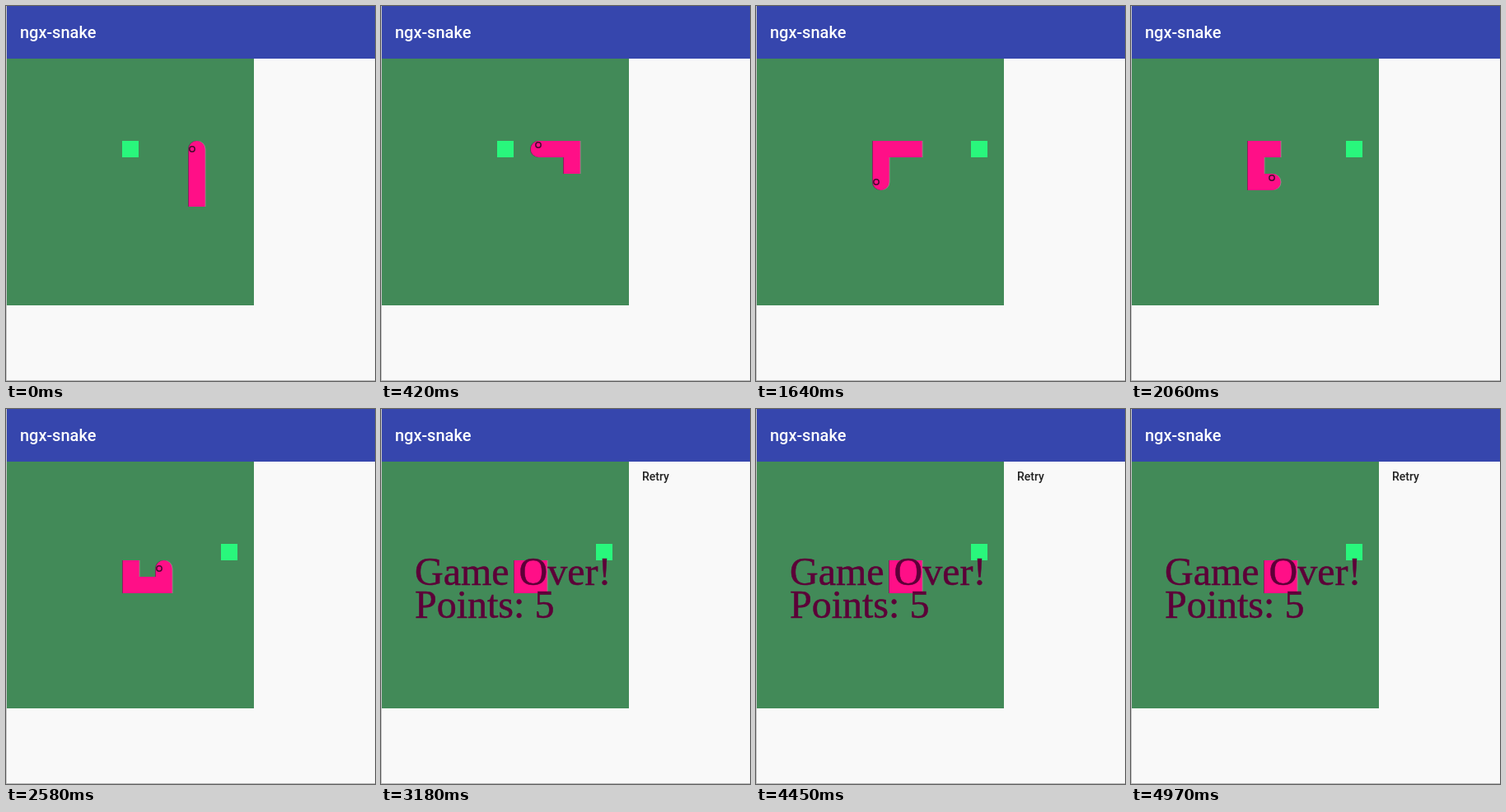
These frames come from a looping animation (448x456 px, 5 s). An HTML page:

```html
<!DOCTYPE html>
<html lang="en">
<head>
<meta charset="utf-8">
<title>ngx-snake</title>
<style>
  html, body { margin: 0; width: 100%; height: 100%; overflow: hidden; background: #f9f9f9; }
  svg { display: block; width: 448px; height: 456px; }
  .ui { font-family: Roboto, sans-serif; font-weight: 500; }
  .result { font: 48px "Liberation Serif", Times, serif; fill: #5c0038; stroke: #5c0038; stroke-width: .5; }
</style>
</head>
<body>
<svg viewBox="0 0 448 456">
  <rect width="448" height="456" fill="#f9f9f9"/>
  <rect width="1" height="456" fill="#c6c6c6"/>
  <rect y="455" width="448" height="1" fill="#b8b8b8"/>
  <rect x="1" width="447" height="64" fill="#3646ad"/>
  <text class="ui" x="17" y="39" font-size="20" fill="#fff">ngx-snake</text>
  <rect x="1" y="64" width="300" height="300" fill="#428a58"/>
  <rect id="food" width="20" height="20" fill="#29f77c"/>
  <path id="lightEdge" fill="#98908a" transform="translate(1.5 0)"/>
  <path id="darkEdge" fill="#4c3048"/>
  <path id="skin" fill="#ff0f87" transform="translate(.7 0)"/>
  <circle id="eye" r="3.2" fill="none" stroke="#4a0a30" stroke-width="1.5"/>
  <g id="gameOver">
    <text class="result" x="41" y="214">Game Over!</text>
    <text class="result" x="41" y="254">Points: 5</text>
    <text class="ui" x="317" y="87" font-size="14" fill="#212121">Retry</text>
  </g>
</svg>
<script>
  const LOOP = 5000, CELL = 20, LEFT = 1, TOP = 64;
  const MOVE_TIMES = [120, 420, 730, 1030, 1330, 1640, 1940, 2240, 2550, 2850, 3180];
  const EAT_MOVE = 4;
  const TURNS = { U: [0, -1], D: [0, 1], L: [-1, 0], R: [1, 0] };
  const ROUTE = 'UUU' + 'LLLLDDRRULD';
  const START_LENGTH = 4;

  const trail = [[11, 8]];
  for (const turn of ROUTE) {
    const [x, y] = trail[trail.length - 1], [dx, dy] = TURNS[turn];
    trail.push([x + dx, y + dy]);
  }

  const el = id => document.getElementById(id);
  const corner = ([col, row]) => [LEFT + col * CELL, TOP + row * CELL];

  function cellPath(cell) {
    const [x, y] = corner(cell);
    return `M${x} ${y}h20v20h-20z`;
  }

  // Half circle towards the heading, square towards the body.
  function headPath(cell, [dx, dy]) {
    const [x, y] = corner(cell), cx = x + 10, cy = y + 10;
    const point = (forward, side) =>
      `${cx + dx * forward - dy * side} ${cy + dy * forward + dx * side}`;
    return `M${point(-10, -10)}L${point(0, -10)}A10 10 0 0 1 ${point(0, 10)}L${point(-10, 10)}z`;
  }

  function draw(time) {
    const moves = MOVE_TIMES.filter(t => t <= time).length;
    const head = START_LENGTH - 1 + moves;
    const ate = moves >= EAT_MOVE;
    const dead = moves === MOVE_TIMES.length;
    const length = START_LENGTH + (ate ? 1 : 0);
    const heading = TURNS[ROUTE[head - 1]];
    const body = trail.slice(head - length + 1, head);
    const shape = headPath(trail[head], heading) + body.map(cellPath).join('');
    for (const id of ['lightEdge', 'darkEdge', 'skin']) el(id).setAttribute('d', shape);

    const [x, y] = corner(trail[head]);
    const sideways = heading[0] !== 0;
    el('eye').setAttribute('cx', x + (sideways ? 10 : 5));
    el('eye').setAttribute('cy', y + (sideways ? 5 : 10));
    el('eye').style.display = dead ? 'none' : '';

    const [foodX, foodY] = corner(ate ? [13, 5] : [7, 5]);
    el('food').setAttribute('x', foodX);
    el('food').setAttribute('y', foodY);
    el('gameOver').style.display = dead ? '' : 'none';
  }

  const start = performance.now();
  function tick() {
    draw((performance.now() - start) % LOOP);
    requestAnimationFrame(tick);
  }
  tick();
</script>
</body>
</html>
```
